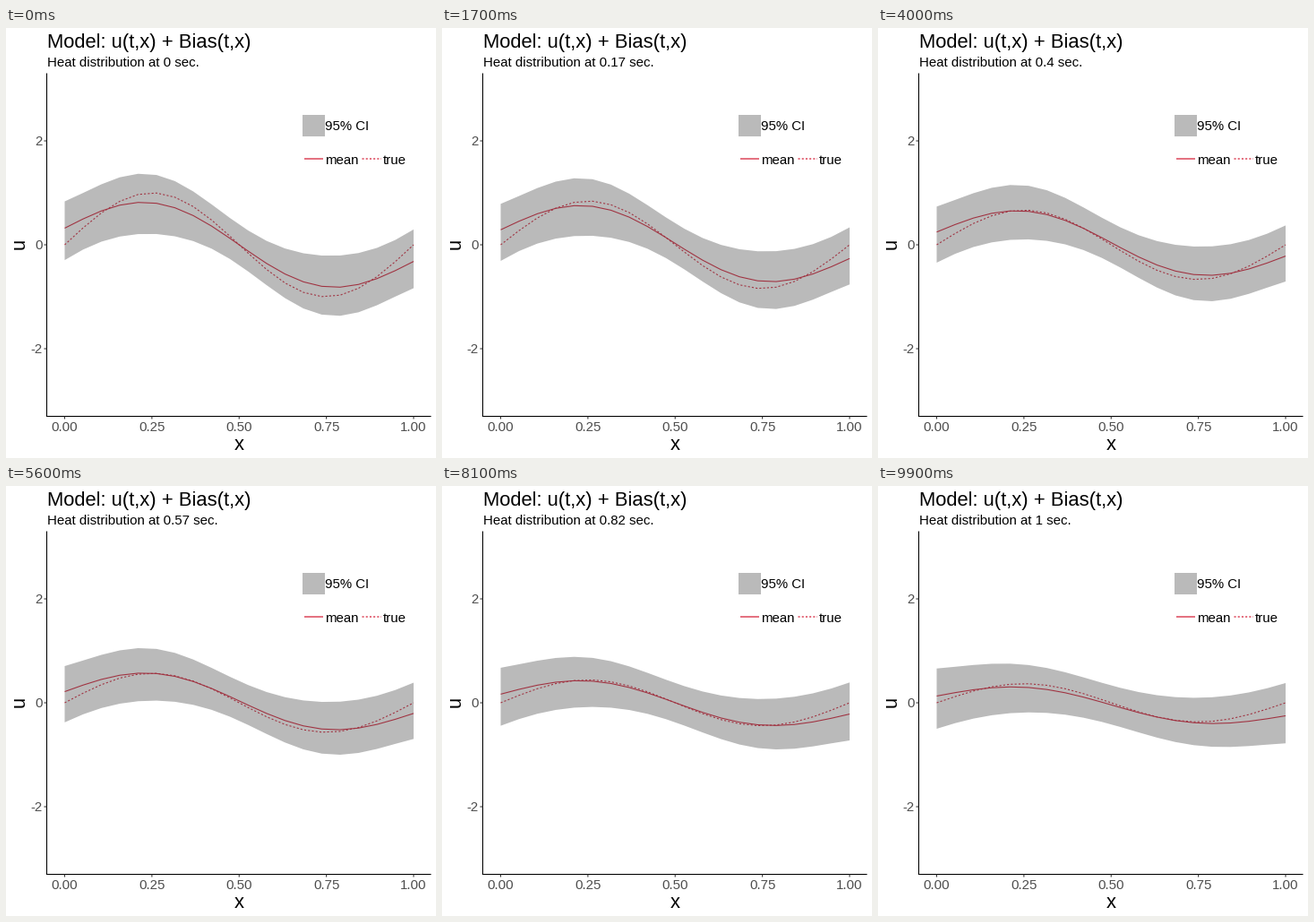
A matplotlib script that plays this animation: 480 px wide and 480 px high, repeating every 10 s.

```python
import numpy as np
import matplotlib.pyplot as plt
from matplotlib.animation import FuncAnimation
from matplotlib.patches import Polygon, Rectangle

plt.rcParams["font.family"] = "Liberation Sans"

SIZE, DPI, FRAMES = 480, 80, 100
PT = 72 / DPI
RED = "#DC4458"
BAND = dict(facecolor="black", alpha=0.27, edgecolor="none", linewidth=0)
DASH = (0, (2, 2))
LEFT, BOTTOM = 45.5, 433.5

x = np.linspace(0, 1, 20)
s = 2 * x - 1
wave = np.sin(2 * np.pi * x)


def true_heat(t):
    return np.exp(-t) * wave


def mean_heat(t):
    """Damped sine plus a slowly drifting bias."""
    amp = 0.65 - 0.35 * t - 0.05 * t**2
    slope = -0.32 + 0.28 * t - 0.15 * t**2
    shift = 0.1 * t - 0.16 * t**2
    bump = 0.1 * t - 0.08 * t**2
    return amp * wave + slope * s + shift + bump * (1 - s**2)


def half_width(t):
    """Uncertainty: narrow mid-rod, wide at the ends and the extrema."""
    ends = 0.175 - 0.1 * t + 0.13 * t**2
    crests = 0.14 - 0.105 * t
    return 0.39 - 0.015 * t + ends * s**2 + crests * wave**2


def px(v):
    return 65.5 + 389.5 * v


def py(v):
    return 242 - 58 * v


fig = plt.figure(figsize=(SIZE / DPI, SIZE / DPI), dpi=DPI, facecolor="white")
ax = fig.add_axes([0, 0, 1, 1])
ax.set(xlim=(0, SIZE), ylim=(SIZE, 0))
ax.axis("off")


def line(xs, ys, color="black", width=1.07, **kw):
    return ax.plot(xs, ys, color=color, lw=width * PT, snap=False,
                   solid_capstyle="butt", dash_capstyle="butt", **kw)[0]


def text(tx, ty, label, size=15, color="black", **kw):
    return ax.text(tx, ty, label, fontsize=size * PT, color=color,
                   va="baseline", **kw)


# Axes
line([LEFT, LEFT], [50.5, BOTTOM + 0.5])
line([LEFT, 474.5], [BOTTOM, BOTTOM])
for v in np.linspace(0, 1, 5):
    line([px(v)] * 2, [BOTTOM, BOTTOM + 3], "#333333")
    text(px(v), 450, f"{v:.2f}", color="#4D4D4D", ha="center")
for v in (-2, 0, 2):
    line([LEFT - 3, LEFT], [py(v)] * 2, "#333333")
    text(41, py(v) + 5, str(v), color="#4D4D4D", ha="right")
text(260, 471, "x", 22, ha="center")
text(20.5, 241, "u", 22, ha="center", rotation=90, rotation_mode="anchor")

# Titles
text(45.5, 22, "Model: u(t,x) + Bias(t,x)", 22)
subtitle = text(45.5, 43, "")

# Legend
ax.add_patch(Rectangle((331, 97), 25, 24, **BAND))
text(356.5, 114, "95% CI")
line([333, 354], [146, 146], RED, 1.5)
text(356.5, 152, "mean")
line([397.5, 419], [146, 146], RED, 1.5, ls=(0, (1.4, 1.4)))
text(421, 152, "true")

# Curves, shaded by the translucent band on top
mean_line = line([], [], RED)
true_line = line([], [], RED, ls=DASH)
band = ax.add_patch(Polygon(np.zeros((3, 2)), closed=True, zorder=3, **BAND))


def update(i):
    t = i / (FRAMES - 1)
    mean = mean_heat(t)
    center, half = mean + 0.05 * s, half_width(t)
    edge = np.r_[center + half, (center - half)[::-1]]
    mean_line.set_data(px(x), py(mean))
    true_line.set_data(px(x), py(true_heat(t)))
    band.set_xy(np.c_[px(np.r_[x, x[::-1]]), py(edge)])
    subtitle.set_text(f"Heat distribution at {round(t, 2):g} sec.")
    return mean_line, true_line, band, subtitle


anim = FuncAnimation(fig, update, frames=FRAMES, interval=100,
                     init_func=lambda: update(0), repeat=True, repeat_delay=0)
plt.show()
```
